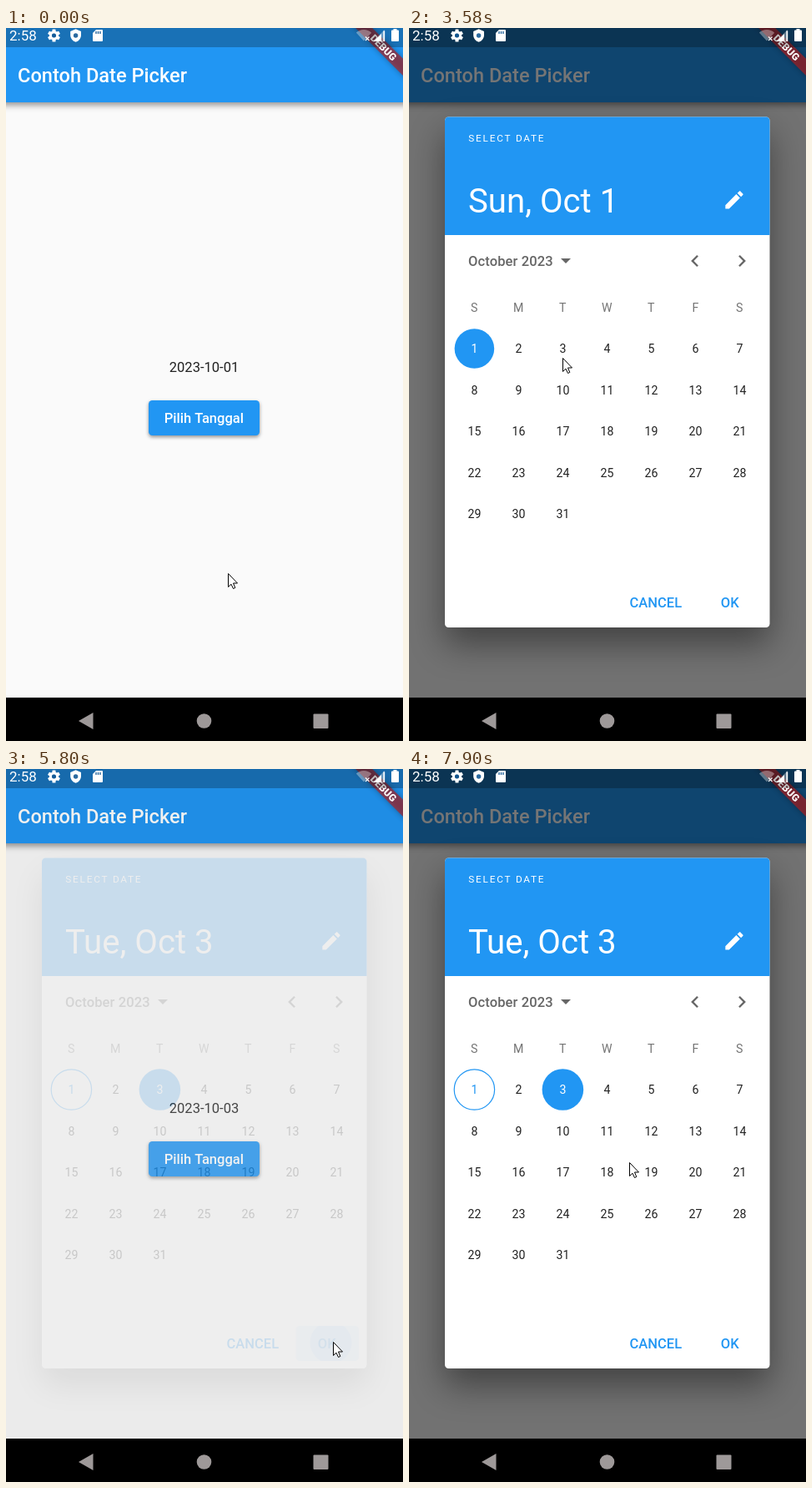
Write an HTML page with a canvas that moves like this. It is 476 px wide and 854 px high and loops after 8 s.

```html
<!DOCTYPE html>
<html lang="id">
<head>
<meta charset="utf-8">
<title>Date picker</title>
<style>
html, body { margin: 0; width: 100%; height: 100%; overflow: hidden; background: #000; }
canvas { display: block; }
</style>
</head>
<body>
<canvas id="stage" width="476" height="854"></canvas>
<script>
const W = 476, H = 854, LOOP = 8000, DP = 1.181;
const BLUE = '#2196f3', GREY = '#666';
const screen = document.getElementById('stage').getContext('2d');
const layer = document.createElement('canvas');
layer.width = W;
layer.height = H;
const sheet = layer.getContext('2d');

const ICON = {
  left: new Path2D('M15.41 7.41L14 6l-6 6 6 6 1.41-1.41L10.83 12z'),
  right: new Path2D('M10 6L8.59 7.41 13.17 12l-4.58 4.59L10 18l6-6z'),
  pen: new Path2D('M3 17.25V21h3.75L17.81 9.94l-3.75-3.75L3 17.25zM20.71 7.04c.39-.39.39-1.02 0-1.41l-2.34-2.34c-.39-.39-1.02-.39-1.41 0l-1.83 1.83 3.75 3.75 1.83-1.83z'),
  arrow: new Path2D('M.5.5V16.5L4 13.2 6.5 18.5 8.8 17.5 6.5 12H11.5z'),
  shield: new Path2D('M0-7.8L6.4-5V-.5C6.4 3.4 3.6 6.8 0 7.8C-3.6 6.8-6.4 3.4-6.4-.5V-5z'),
  card: new Path2D('M108 2H115Q116 2 116 3V15Q116 16 115 16H105Q104 16 104 15V6z')
};

// Cursor travel: start, end, steps, from, control, to
const MOVES = [
  [270, 1040, 12, 266, 653, 336, 545, 233, 454],
  [1110, 1310, 4, 233, 454, 233, 459, 233, 464],
  [3030, 3580, 9, 233, 464, 208, 425, 184, 395],
  [4630, 5180, 9, 184, 395, 452, 545, 392, 686],
  [6130, 6340, 4, 392, 686, 335, 595, 283, 515],
  [6540, 6820, 5, 283, 515, 271, 488, 264, 470],
  [7020, 7020, 1, 264, 470, 264, 470, 264, 471]
];

// Held values: [time, value, time, value, ...]
const CLICK = [0, 0, 1510, 1, 1780, 0, 3910, 1, 4130, 0, 5380, 1, 5520, 0, 7480, 1, 7620, 0];
const DIALOG = [0, 0, 2500, 1, 5730, .65, 5800, .17, 5870, 0, 7760, .3, 7830, .8, 7900, 1];
const BARRIER = [0, 0, 2500, 1, 5730, .5, 5800, .11, 5870, 0, 7760, .3, 7830, .75, 7900, 1];
const PRESS = [0, 0, 1780, 1, 2500, 0, 7620, 1];
const RIPPLE = [0, 0, 2370, 25, 2500, 0, 7620, 17, 7690, 25];
const OK_RIPPLE = [0, 0, 5450, 10, 5520, 17, 5590, 22, 5660, 25, 5870, 0];

function held(list, t) {
  let v = list[1];
  for (let i = 0; i < list.length && list[i] <= t; i += 2) v = list[i + 1];
  return v;
}

function cursorAt(t) {
  let pos = [266, 653];
  for (const [a, b, n, x0, y0, cx, cy, x1, y1] of MOVES) {
    if (t < a) break;
    const step = b > a ? Math.floor((t - a) / (b - a) * (n - 1) + 1e-6) + 1 : n;
    const p = Math.min(1, step / n), u = p * p * (3 - 2 * p), v = 1 - u;
    const mix = (s, c, e) => Math.round(v * v * s + 2 * u * v * c + u * u * e);
    pos = [mix(x0, cx, x1), mix(y0, cy, y1)];
  }
  return pos;
}

function text(g, str, x, y, size, color, { weight = 400, align = 'left', gap = 0 } = {}) {
  g.font = `${weight} ${size}px Roboto, sans-serif`;
  g.letterSpacing = gap + 'px';
  g.textAlign = align;
  g.fillStyle = color;
  g.fillText(str, x, y);
}

function box(g, x, y, w, h, r, color) {
  g.fillStyle = color;
  g.beginPath();
  g.roundRect(x, y, w, h, r);
  g.fill();
}

function disc(g, x, y, r, color) {
  g.fillStyle = color;
  g.beginPath();
  g.arc(x, y, r, 0, 7);
  g.fill();
}

function poly(g, color, ...p) {
  g.fillStyle = color;
  g.beginPath();
  for (let i = 0; i < p.length; i += 2) g.lineTo(p[i], p[i + 1]);
  g.fill();
}

function icon(g, path, x, y, color, scale = DP) {
  g.save();
  g.translate(x, y);
  g.scale(scale, scale);
  g.fillStyle = color;
  g.fill(path);
  g.restore();
}

function shadow(g, dy, blur, alpha, draw) {
  g.save();
  g.shadowColor = `rgba(0,0,0,${alpha})`;
  g.shadowBlur = blur;
  g.shadowOffsetY = dy;
  draw();
  g.restore();
}

function inkBox(g, x, y, w, h, tint, cx, cy, r, splash) {
  g.save();
  box(g, x, y, w, h, 4.5, tint);
  g.clip();
  if (r) disc(g, cx, cy, r, splash);
  g.restore();
}

function page(g, t) {
  g.fillStyle = '#fafafa';
  g.fillRect(0, 0, W, 803);
  shadow(g, 3, 8, .45, () => {
    g.fillStyle = BLUE;
    g.fillRect(-20, -20, W + 40, 109);
  });
  text(g, 'Contoh Date Picker', 14, 65, 23.6, '#fff', { weight: 500 });

  text(g, t < 5730 ? '2023-10-01' : '2023-10-03', 237.5, 411.5, 16.53, '#212121', { align: 'center' });

  const down = held(PRESS, t);
  const button = () => box(g, 171, 446, 133, 42, 4.5, BLUE);
  shadow(g, down ? 5 : 2, down ? 11 : 4, down ? .45 : .42, button);
  if (down) {
    inkBox(g, 171, 446, 133, 42, 'rgba(255,255,255,.12)', t < 5000 ? 233 : 264, t < 5000 ? 465 : 471,
      held(RIPPLE, t), 'rgba(255,255,255,.24)');
  }
  text(g, 'Pilih Tanggal', 237.3, 473, 16.53, '#fff', { weight: 500, align: 'center' });
}

function dialog(g, t) {
  const picked = t < 4130 ? 1 : 3;
  g.clearRect(0, 0, W, H);
  shadow(g, 20, 40, .42, () => box(g, 43, 106.5, 389.5, 611.5, 4.5, '#fff'));
  box(g, 43, 106.5, 389.5, 141.5, [4.5, 4.5, 0, 0], BLUE);
  text(g, 'SELECT DATE', 71.3, 136, 11.81, '#fff', { gap: 1.77 });
  text(g, picked === 1 ? 'Sun, Oct 1' : 'Tue, Oct 3', 71, 220.5, 40.15, '#fff');
  icon(g, ICON.pen, 375.8, 191.8, '#fff');

  text(g, 'October 2023', 71, 285, 16.53, GREY, { weight: 500, gap: .12 });
  poly(g, GREY, 182, 276, 194, 276, 188, 282);
  icon(g, ICON.left, 328.7, 264.8, GREY);
  icon(g, ICON.right, 385, 264.8, GREY);

  const center = { align: 'center' };
  [...'SMTWTFS'].forEach((c, i) => text(g, c, 78.3 + i * 53, 339.5, 14.17, '#757575', center));
  for (let d = 1; d <= 31; d++) {
    const x = 78.4 + (d - 1) % 7 * 53, y = 384 + Math.floor((d - 1) / 7) * 49.6;
    let color = '#212121';
    if (d === picked) {
      disc(g, x, y, d === 1 ? 23.8 : 24.8, BLUE);
      color = '#fff';
    } else if (d === 1) {
      g.strokeStyle = color = BLUE;
      g.lineWidth = 1.2;
      g.beginPath();
      g.arc(x, y, 24.2, 0, 7);
      g.stroke();
    }
    text(g, d, x, y + 5, 14.17, color, center);
  }

  const r = held(OK_RIPPLE, t);
  if (r) inkBox(g, 347.5, 667, 75.5, 42, 'rgba(33,150,243,.12)', 389.5, 687, r, 'rgba(33,150,243,.15)');
  text(g, 'CANCEL', 264.5, 693.5, 16.53, BLUE, { weight: 500 });
  text(g, 'OK', 373.8, 693.5, 16.53, r ? '#64b0ee' : BLUE, { weight: 500 });
}

function banner(g) {
  g.save();
  g.translate(481, -5);
  g.rotate(Math.PI / 4);
  shadow(g, 0, 7, .5, () => {
    g.fillStyle = 'rgba(183,28,28,.63)';
    g.fillRect(-47.2, 33.1, 94.4, 14.2);
  });
  text(g, 'DEBUG', 0, 44.4, 12, '#fff', { weight: 900, align: 'center' });
  g.restore();
}

function statusBar(g) {
  const sky = 'rgba(20,90,150,.9)';
  text(g, '2:58', 4, 15.3, 17, '#fff');
  // Gear
  g.save();
  g.translate(57.5, 9);
  for (let i = 0; i < 6; i++) {
    g.rotate(Math.PI / 3);
    box(g, -2, -7.5, 4, 5, .5, '#fff');
  }
  g.strokeStyle = '#fff';
  g.lineWidth = 3.2;
  g.beginPath();
  g.arc(0, 0, 4.1, 0, 7);
  g.stroke();
  disc(g, 0, 0, 2.5, sky);
  g.restore();
  // Shield
  icon(g, ICON.shield, 83.6, 9, '#fff', 1);
  disc(g, 83.6, 9, 2.7, sky);
  // Memory card
  icon(g, ICON.card, 0, 0, '#fff', 1);
  for (const x of [107.3, 109.8, 112.3]) box(g, x, 4, 1.4, 3, 0, sky);
  // Wi-Fi without connection
  g.fillStyle = 'rgba(255,255,255,.35)';
  g.beginPath();
  g.moveTo(429, 15.5);
  g.arc(429, 15.5, 13.5, -2.32, -.82);
  g.fill();
  g.strokeStyle = '#fff';
  g.lineWidth = 1.2;
  g.beginPath();
  g.moveTo(431, 10.5);
  g.lineTo(435.5, 15);
  g.moveTo(435.5, 10.5);
  g.lineTo(431, 15);
  g.stroke();
  // Signal and battery
  poly(g, 'rgba(255,255,255,.35)', 440, 16, 454, 2, 454, 16);
  poly(g, '#fff', 441, 16, 450, 7, 450, 16);
  g.strokeRect(453, 4, .6, 11.5);
  box(g, 462, 2.5, 9, 13.5, 1, '#fff');
  box(g, 464.5, 1, 4, 2, 0, '#fff');
}

function navBar(g) {
  const c = '#9e9999';
  g.fillStyle = '#000';
  g.fillRect(0, 802, W, 52);
  poly(g, c, 87, 830, 104.5, 820, 104.5, 840);
  disc(g, 237.5, 830, 8.8, c);
  box(g, 368.5, 821.5, 18, 17.5, 1, c);
}

function pointer(g, t) {
  const [x, y] = cursorAt(t);
  g.save();
  g.translate(x, y);
  g.fillStyle = '#fff';
  g.strokeStyle = '#000';
  g.lineWidth = 1;
  g.fill(ICON.arrow);
  g.stroke(ICON.arrow);
  g.restore();
  if (held(CLICK, t)) disc(g, x, y, 15, 'rgba(255,255,0,.5)');
}

function draw(t) {
  const g = screen, shown = held(DIALOG, t);
  page(g, t);
  if (shown) {
    g.fillStyle = `rgba(0,0,0,${.54 * held(BARRIER, t)})`;
    g.fillRect(0, 0, W, 803);
    dialog(sheet, t);
    g.globalAlpha = shown;
    g.drawImage(layer, 0, 0);
    g.globalAlpha = 1;
  }
  banner(g);
  g.fillStyle = 'rgba(0,0,0,.25)';
  g.fillRect(0, 0, W, 23);
  statusBar(g);
  navBar(g);
  pointer(g, t);
}

const start = performance.now();
function tick() {
  draw((performance.now() - start) % LOOP);
  requestAnimationFrame(tick);
}
tick();
</script>
</body>
</html>
```
